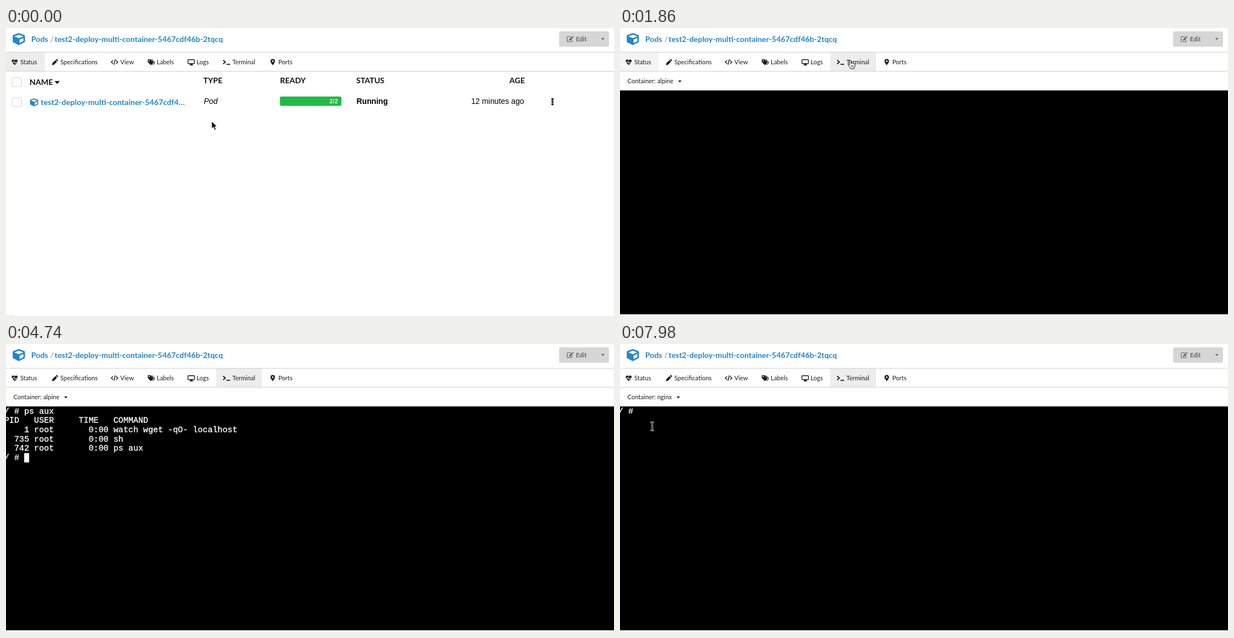
These frames come from a looping animation (1085x516 px, 8000 ms). An HTML page:

```html
<!DOCTYPE html>
<html lang="en">
<head>
<meta charset="utf-8">
<title>Pod terminal</title>
<style>
html, body { margin: 0; width: 100%; height: 100%; overflow: hidden; background: #fff; }
svg { display: block; width: 1085px; height: 516px; font: 11px Lato, sans-serif; fill: #1b1c1d; }
text { white-space: pre; }
.big { font-size: 14px; font-weight: 700; }
.title { font-size: 13.87px; font-weight: 700; }
.blue { fill: #2185d0; }
.sans { font: 13.8px "Liberation Sans", Arial, sans-serif; fill: #000; }
.bold { font-weight: 700; }
.line { fill: none; stroke: #1b1c1d; stroke-width: 1.5; }
#rows { font: 14.75px "Liberation Mono", monospace; fill: #fff; stroke: #fff; stroke-width: .35; }
</style>
</head>
<body>
<svg viewBox="0 0 1085 516">
  <defs>
    <path id="cube" fill-rule="evenodd" d="M239 6L31 84C12 91 0 109 0 129V354c0 18 10 35 26 43l208 104c14 7 30 7 43 0l208-104c16-8 27-25 27-43V129c0-20-13-38-31-45L273 6c-11-4-23-4-34 0zM256 68l192 72v2l-192 78-192-78v-2zM288 424V275l160-65v134z"/>
    <path id="caret" d="M0 0h6l-3 3.6z"/>
    <path id="pencil" d="M0 11l.7-3.4 5.6-5.6 2.8 2.8-5.6 5.6zM7 1.3l1-1c.4-.4.8-.4 1.2 0l1.6 1.6c.4.4.4.8 0 1.2l-1 1z"/>
    <path id="beamShape" d="M-3.5-7.5q3.5 0 3.5 2v11q0 2-3.5 2M3.5-7.5q-3.5 0-3.5 2v11q0 2 3.5 2M-2 2.5h4"/>
  </defs>

  <!-- title bar -->
  <use href="#cube" class="blue" transform="translate(12 9) scale(.0425)"/>
  <text class="title blue" x="45" y="25.4">Pods</text>
  <text x="79" y="25.4" style="font-size:14px;fill:#888">/</text>
  <text class="title blue" x="86.8" y="25.4">test2-deploy-multi-container-5467cdf46b-2tqcq</text>
  <rect x="987" y="6" width="89" height="27.5" rx="3" fill="#d6d6d7"/>
  <g fill="#666">
    <path d="M1008 15.5h-5.5q-1 0-1 1v7q0 1 1 1h6.5q1 0 1-1v-3" fill="none" stroke="#666" stroke-width="1.2"/>
    <use href="#pencil" transform="translate(1004.5 14.5) scale(.75)"/>
    <text class="bold" x="1017" y="24">Edit</text>
    <use href="#caret" x="1062" y="18"/>
  </g>

  <!-- tabs -->
  <rect id="statusTab" y="44" width="69" height="33"/>
  <rect id="termTab" x="375" y="44" width="82" height="33"/>
  <path d="M0 43.5h1085M0 77.5h1085" stroke="#d0d0d1"/>
  <g id="tabs"></g>
  <path d="M15.5 66.5l-4.7-5c-1.6-2.3-.2-5 2-5 1.3 0 2.2.7 2.7 1.5.5-.8 1.4-1.5 2.7-1.5 2.2 0 3.6 2.7 2 5z"/>
  <path d="M10 61.3h3l1.2-2 1.8 4.2 1.3-2.2h3.7" fill="none" stroke="#fff"/>
  <use href="#pencil" x="82" y="55.5"/>
  <path class="line" d="M191 58l-3 3 3 3M196.5 58l3 3-3 3M195 56.2l-2.3 9.6"/>
  <path fill-rule="evenodd" d="M253 57q0-1 1-1h4l5 5q.7.8 0 1.5l-3.6 3.6q-.8.7-1.5 0l-4.9-5zM255.5 57.6a1 1 0 1 0 .1 0z"/>
  <path class="line" d="M260 56.3l5 5q.6.7 0 1.4l-3.4 3.4" style="stroke-width:1.2"/>
  <rect class="line" x="324.7" y="56.7" width="11.6" height="7" rx="1" style="stroke-width:1.4"/>
  <path d="M329 64h3.5l.5 2h1v1h-6.5v-1h1z"/>
  <path class="line" d="M387.5 57.5l4 3.5-4 3.5M393.5 65.2h6.5" style="stroke-width:1.8"/>
  <path fill-rule="evenodd" d="M476 67c-1-2.2-4-4.5-4-7.5a4 4 0 0 1 8 0c0 3-3 5.3-4 7.5zM476 58a1.5 1.5 0 1 0 .1 0z"/>

  <!-- pod list -->
  <g id="list">
    <g fill="#fff" stroke="#cfcfd0">
      <rect x="11" y="89" width="16.5" height="16" rx="3"/>
      <rect x="11" y="125" width="16.5" height="16" rx="3"/>
    </g>
    <g class="big" fill="#111">
      <text x="42" y="102.1">NAME</text>
      <text x="352" y="99.3">TYPE</text>
      <text x="489" y="99.3">READY</text>
      <text x="625" y="99.3">STATUS</text>
      <text x="926" y="99.3" text-anchor="end">AGE</text>
    </g>
    <path d="M86.5 95h9.5l-4.7 5.5z"/>
    <use href="#cube" class="blue" transform="translate(43 126) scale(.0282)"/>
    <text class="big blue" x="62" y="138">test2-deploy-multi-container-5467cdf4…</text>
    <text class="sans" x="353" y="135.6" style="font-style:italic">Pod</text>
    <rect x="488.8" y="122.7" width="109.8" height="16.8" rx="3" fill="#21ba45"/>
    <text class="sans" x="577" y="134.8" style="font-size:11px;font-weight:700;fill:#d9f3df">2/2</text>
    <text class="sans" x="625.5" y="135.6" style="font-weight:700">Running</text>
    <text class="sans" x="924.5" y="135.6" text-anchor="end">12 minutes ago</text>
    <path d="M975.2 127.5v.01m0 4.5v.01m0 4.5v.01" stroke="#000" stroke-width="4" stroke-linecap="round"/>
    <rect y="515" width="15" height="1" fill="#e4e4e4"/>
  </g>

  <!-- terminal -->
  <g id="term">
    <path d="M0 111.5h1085" stroke="#d0d0d1"/>
    <rect y="112" width="1085" height="401" fill="#000"/>
    <g id="rows"></g>
    <rect id="block" width="8.85" stroke="#fff"/>
  </g>
  <g id="picker">
    <text id="label" x="13.3" y="99.3"></text>
    <use id="arrow" href="#caret" y="94"/>
  </g>
  <g id="menu">
    <path d="M0 112h126v53q0 3-3 3H0z" fill="#f8f8f8"/>
    <path id="hover" d="M0 140h126v25q0 3-3 3H0z" fill="#eee"/>
    <text class="bold" x="11.5" y="129.8">alpine</text>
    <text x="11.5" y="158.3">nginx</text>
  </g>

  <!-- pointers, each with its hot spot at 0,0 -->
  <g id="pointer">
    <path id="plain" d="M0 0v13.5l3.1-2.9 2.2 5.2 2.5-1-2.2-5.1h4.2z" fill="#000" stroke="#fff"/>
    <g id="hand" fill="#fff" stroke="#111" stroke-linejoin="round">
      <path d="M-1.5 1c0-1.6 2.4-1.6 2.6 0l.4 4.5c.4-1.2 2.3-1 2.5.3.5-.9 2.1-.7 2.3.5.6-.8 2-.4 2 .8v3.2c0 1.5-1.2 2.5-1.3 4.7H.6c-.4-2-3.4-4.4-4.5-6.5-.5-1.3 1.4-1.9 2.7-.2z"/>
      <path d="M1.7 9v3.5M3.7 9v3.5M5.7 9v3.5" stroke-width=".8"/>
    </g>
    <g id="beam" fill="none">
      <use href="#beamShape" stroke="#ddd" stroke-width="2.6"/>
      <use href="#beamShape" stroke="#000"/>
    </g>
  </g>
</svg>
<script>
const LOOP = 8000, STEP = 60, COL = 8.85, ROW = 16.7, LEFT = -3, TOP = 112;
const SVG = "http://www.w3.org/2000/svg";
const $ = id => document.getElementById(id);
const set = (id, attrs) => { for (const k in attrs) $(id).setAttribute(k, attrs[k]); };
const show = (id, on) => { $(id).style.display = on ? "" : "none"; };
const clamp = v => Math.max(0, Math.min(1, v));

function addText(parent, x, y) {
  const el = document.createElementNS(SVG, "text");
  el.setAttribute("x", x);
  el.setAttribute("y", y);
  return $(parent).appendChild(el);
}

const tabs = { Status: 25.5, Specifications: 97, View: 204, Labels: 269, Logs: 340, Terminal: 404, Ports: 486 };
for (const name in tabs) addText("tabs", tabs[name], 65).textContent = name;

const rows = Array.from({ length: 6 }, (_, i) => addText("rows", LEFT, TOP + 12.6 + i * ROW));

const PROMPT = "/ # ", COMMAND = "ps aux";
const OUTPUT = [
  "PID   USER     TIME   COMMAND",
  "    1 root       0:00 watch wget -qO- localhost",
  "  735 root       0:00 sh",
  "  742 root       0:00 ps aux",
  PROMPT
];

function terminalLines(t) {
  if (t < 2160) return [];
  if (t >= 7260) return t < 7680 ? [] : [PROMPT];
  const typed = t < 3480 ? 0 : Math.floor((t - 3480) / 180) + 1;
  const lines = [PROMPT + COMMAND.slice(0, typed)];
  if (t >= 4680) lines.push(...OUTPUT);
  else if (t >= 4560) lines.push("");
  return lines;
}

// start time, end time, destination
const moves = [[0, 480, 411, 58], [2760, 3240, 300, 201], [5160, 5940, 76, 104], [6300, 6900, 57.5, 147.5]];

function pointerAt(t) {
  let x = 367, y = 167;
  for (const [start, end, toX, toY] of moves) {
    const p = clamp((t - start) / (end - start)), e = p * p * (3 - 2 * p);
    x += (toX - x) * e;
    y += (toY - y) * e;
  }
  return [x, y];
}

function pointerKind(t, x, y, menuOpen) {
  if (y < 77) return x > 375 && x < 457 ? "hand" : "plain";
  if (y < 112) return t > 5000 && x < 115 ? "hand" : "plain";
  if (t < 1860) return "plain";
  return menuOpen ? "hand" : "beam";
}

function draw(t) {
  const inTerm = t >= 1860;
  show("list", !inTerm);
  show("term", inTerm);
  show("picker", inTerm);
  set("statusTab", { fill: t < 1860 ? "#ededed" : t < 1920 ? "#f4f4f4" : "#fff" });
  set("termTab", { fill: inTerm ? "#ededed" : t >= 480 ? "#f4f4f4" : "#fff" });

  const lines = terminalLines(t);
  rows.forEach((row, i) => { row.textContent = lines[i] || ""; });
  const last = lines.length - 1;
  const focused = t < 5940;
  const inset = focused ? 0 : .5;
  show("block", t >= 3240 && t < 7260);
  if (last >= 0) set("block", {
    x: LEFT + lines[last].length * COL + inset,
    y: TOP + last * ROW + inset,
    height: ROW - 2 * inset,
    fill: focused ? "#fff" : "none",
    "stroke-width": 2 * inset
  });

  const expanded = t >= 6120 && t < 7260;
  const open = clamp((t - 6060) / 240) * clamp((7380 - t) / 180);
  const nginx = t >= 7260;
  $("label").textContent = "Container: " + (nginx ? "nginx" : "alpine");
  set("label", { class: expanded ? "bold" : "" });
  set("arrow", { x: nginx ? 101 : expanded ? 105.7 : 103.8 });
  show("menu", t >= 6120 && open > 0);
  set("menu", { opacity: open, transform: `translate(0 ${TOP * (1 - open)}) scale(1 ${open})` });

  const [x, y] = pointerAt(t);
  show("hover", y > 140);
  const kind = pointerKind(t, x, y, expanded);
  for (const id of ["plain", "hand", "beam"]) show(id, id === kind);
  show("pointer", t < 3480 || t >= 5220);
  set("pointer", { transform: `translate(${x} ${y})` });
}

const begin = performance.now();
function tick() {
  const t = (performance.now() - begin) % LOOP;
  draw(Math.floor(t / STEP) * STEP);
  requestAnimationFrame(tick);
}
tick();
</script>
</body>
</html>
```
